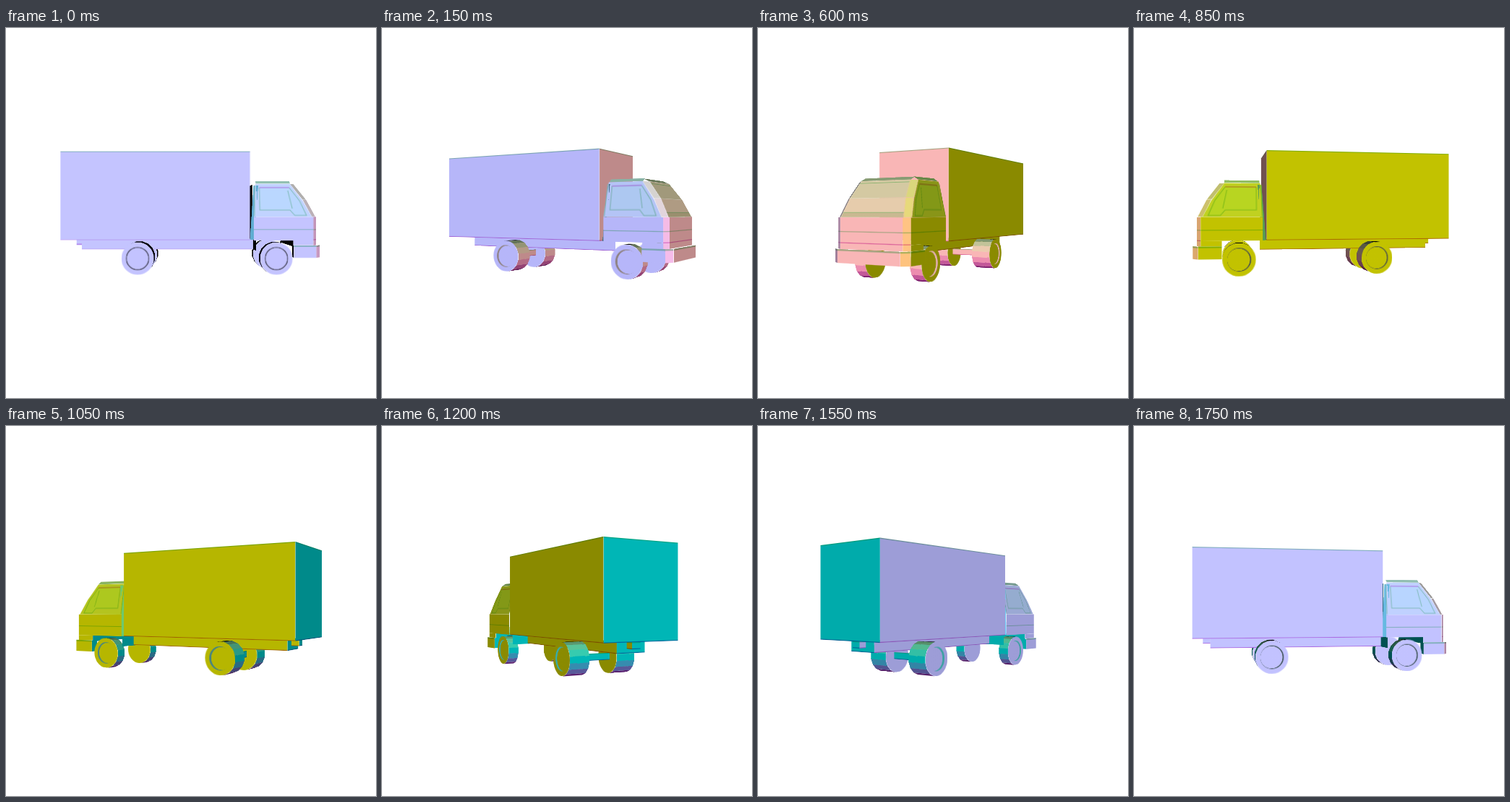
Write an HTML page without scripts that moves like this. It is 512 px wide and 512 px high and loops after 1.8 s.

```html
<!DOCTYPE html>
<html lang="en">
<head>
<meta charset="utf-8">
<title>Truck turntable</title>
<style>
@property --a { syntax: "<angle>"; inherits: true; initial-value: 0deg; }
html, body { margin: 0; width: 100%; height: 100%; overflow: hidden; background: #fff; }
.stage { position: relative; width: 512px; height: 512px; overflow: hidden; perspective: 748px; }
.truck, .wheel { position: absolute; transform-style: preserve-3d; }
.truck {
  left: 256px; top: 256px;
  transform: rotateY(calc(var(--a) * -1));
  animation: turn 1.8s steps(36) infinite;
}
@keyframes turn { from { --a: 0deg; } to { --a: 360deg; } }

/* A face: centre x y z, heading r, upward tilt t, size w h */
.p {
  --x: 0; --y: 0; --z: 0; --r: 0deg; --t: 0deg;
  --nx: calc(sin(var(--r)) * cos(var(--t)));
  --ny: sin(var(--t));
  --nz: calc(cos(var(--r)) * cos(var(--t)));
  transform: translate3d(calc(var(--x) * 1px), calc(var(--y) * 1px), calc(var(--z) * 1px))
    rotateY(var(--r)) rotateX(var(--t)) translate(-50%, -50%);
}
.wheel i {
  --w: 8.6; --h: var(--d);
  --f: calc(var(--i) * 22.5deg);
  --nx: sin(var(--f)); --ny: cos(var(--f)); --nz: 0;
  transform: rotateZ(var(--f)) translateY(-20.8px) rotateX(90deg) translate(-50%, -50%);
}
/* Colour comes from the normal, brightness from how far it faces the viewer */
.p, .wheel i {
  --k: calc(268 * pow(max(0, var(--nx) * sin(var(--a)) + var(--nz) * cos(var(--a))), .5));
  --cr: calc(var(--k) * pow(max(0, .5 + .5 * var(--nx)), .4545));
  --cg: calc(var(--k) * pow(max(0, .5 + .5 * var(--ny)), .4545));
  --cb: calc(var(--k) * pow(max(0, .5 + .5 * var(--nz)), .4545));
  --up: rgb(calc(var(--cr) * .68) calc(var(--cg) * .9) calc(var(--cb) * .72));
  --lo: rgb(calc(var(--cr) * .88) calc(var(--cg) * .55) calc(var(--cb) * .85));
  --pane: rgb(calc(var(--cr) * .96) calc(var(--cg) * 1.02) calc(var(--cb) * .98));
  color: rgb(var(--cr) var(--cg) var(--cb));
  position: absolute; left: 0; top: 0;
  width: calc(var(--w) * 1px); height: calc(var(--h) * 1px);
  transform-origin: 0 0;
  backface-visibility: hidden;
  background: currentColor;
}
.box { background: linear-gradient(var(--up) .7px, transparent 0 calc(100% - .8px), var(--lo) 0) currentColor; }
.nose { background: linear-gradient(transparent 16px, var(--up) 16px 16.7px, transparent 0 29.5px, var(--lo) 29.5px 30.2px, transparent 0) currentColor; }
.bump { background: linear-gradient(var(--up) 2px, transparent 0) currentColor; }
.glass { clip-path: polygon(4.5px 0, calc(100% - 4.5px) 0, 100% 100%, 0 100%); }
.glass.top { background: linear-gradient(transparent 3px, var(--up) 3px 4px, transparent 0) currentColor; }
.glass.low { background: linear-gradient(transparent 18px, var(--up) 18px 19.2px, #28500028 0) currentColor; }
.art { background: none; }
.art svg { display: block; width: 100%; height: 100%; overflow: visible; }
.flip svg { transform: scaleX(-1); }
.fill { fill: currentColor; }
.pane { fill: var(--pane); }
.lo, .up { fill: none; stroke-width: 1.1; }
.lo { stroke: var(--lo); }
.up { stroke: var(--up); }

.wheel { transform: translate3d(calc(var(--wx) * 1px), 59px, calc(var(--wz) * 1px)); }
.disc { --w: 42; --h: 42; border-radius: 50%; }
.disc.l { --z: calc(var(--d) / 2); }
.disc.r { --z: calc(var(--d) / -2); --r: 180deg; }
/* Recessed hub: the floor slides and uncovers the inner wall */
.rim::before {
  content: ""; position: absolute; inset: 5.8px; border-radius: 50%;
  --s: sin(var(--a));
  --q: pow(max(var(--s), -1 * var(--s)), .5);
  background:
    radial-gradient(circle at calc(50% + 4px * sin(var(--a) - var(--r))) 50%, currentColor 13.9px, transparent 14.5px),
    rgb(calc(var(--q) * (150 + 105 * var(--s))) calc(var(--q) * 185) calc(var(--q) * 185));
}
i:nth-of-type(1) { --i: 0; } i:nth-of-type(2) { --i: 1; }
i:nth-of-type(3) { --i: 2; } i:nth-of-type(4) { --i: 3; }
i:nth-of-type(5) { --i: 4; } i:nth-of-type(6) { --i: 5; }
i:nth-of-type(7) { --i: 6; } i:nth-of-type(8) { --i: 7; }
i:nth-of-type(9) { --i: 8; } i:nth-of-type(10) { --i: 9; }
i:nth-of-type(11) { --i: 10; } i:nth-of-type(12) { --i: 11; }
i:nth-of-type(13) { --i: 12; } i:nth-of-type(14) { --i: 13; }
i:nth-of-type(15) { --i: 14; } i:nth-of-type(16) { --i: 15; }
</style>
</head>
<body>
<svg width="0" height="0" style="position:absolute">
  <symbol id="door" viewBox="0 0 75 44">
    <path class="fill" d="M3 0H48L64 22.5L75 44H0Z"/>
    <path class="pane" d="M8 5H47L60 23L68 42H53L47 35H8Z"/>
    <path class="up" d="M45 9L50 33M8 5V35H47L53 42H68L60 23L47 5M2 2L1 43"/>
    <path class="lo" d="M8 5H47" stroke-width="2"/>
  </symbol>
  <symbol id="post-low" viewBox="0 0 12.9 24.8">
    <path class="fill" d="M0 0H9.2L12.9 24.8H3.7Z"/>
  </symbol>
  <symbol id="post-top" viewBox="0 0 16.3 25.8">
    <path class="fill" d="M0 0H9.2L16.3 25.8H7.1Z"/>
  </symbol>
</svg>

<div class="stage"><div class="truck">
  <!-- cargo box -->
  <div class="p box" style="--x:-45.9;--y:-22.4;--z:52;--w:244.4;--h:114"></div>
  <div class="p box" style="--x:-45.9;--y:-22.4;--z:-52;--w:244.4;--h:114;--r:180deg"></div>
  <div class="p box" style="--x:76.3;--y:-22.4;--w:104;--h:114;--r:90deg"></div>
  <div class="p box" style="--x:-168.1;--y:-22.4;--w:104;--h:114;--r:-90deg"></div>

  <!-- chassis, hitch, axle -->
  <div class="p box" style="--x:-32;--y:41.3;--z:20;--w:230;--h:13.5"></div>
  <div class="p box" style="--x:-32;--y:41.3;--z:-20;--w:230;--h:13.5;--r:180deg"></div>
  <div class="p box" style="--x:-147;--y:41.3;--w:40;--h:13.5;--r:-90deg"></div>
  <div class="p box" style="--x:-152;--y:39.3;--z:6;--w:10;--h:8"></div>
  <div class="p box" style="--x:-152;--y:39.3;--z:-6;--w:10;--h:8;--r:180deg"></div>
  <div class="p box" style="--x:-157;--y:39.3;--w:12;--h:8;--r:-90deg"></div>
  <div class="p box" style="--x:-64;--y:58;--w:40;--h:9;--r:90deg"></div>
  <div class="p box" style="--x:-75;--y:58;--w:40;--h:9;--r:-90deg"></div>

  <!-- cab sides -->
  <div class="p art" style="--x:118.5;--y:-16.5;--z:46.5;--w:75;--h:44;--t:11.8deg"><svg><use href="#door"/></svg></div>
  <div class="p art flip" style="--x:118.5;--y:-16.5;--z:-46.5;--w:75;--h:44;--r:180deg;--t:11.8deg"><svg><use href="#door"/></svg></div>
  <div class="p nose" style="--x:119.5;--y:20;--z:51;--w:77;--h:30"></div>
  <div class="p nose" style="--x:119.5;--y:20;--z:-51;--w:77;--h:30;--r:180deg"></div>
  <div class="p" style="--x:145;--y:38.5;--z:51;--w:26;--h:7.4"></div>
  <div class="p" style="--x:145;--y:38.5;--z:-51;--w:26;--h:7.4;--r:180deg"></div>

  <!-- cab front and corners -->
  <div class="p art" style="--x:153.5;--y:-6;--z:45.2;--w:12.9;--h:24.8;--r:49.4deg;--t:27.3deg"><svg><use href="#post-low"/></svg></div>
  <div class="p art flip" style="--x:153.5;--y:-6;--z:-45.2;--w:12.9;--h:24.8;--r:130.6deg;--t:27.3deg"><svg><use href="#post-low"/></svg></div>
  <div class="p art" style="--x:140;--y:-27.5;--z:40.7;--w:16.3;--h:25.8;--r:49.4deg;--t:35.6deg"><svg><use href="#post-top"/></svg></div>
  <div class="p art flip" style="--x:140;--y:-27.5;--z:-40.7;--w:16.3;--h:25.8;--r:130.6deg;--t:35.6deg"><svg><use href="#post-top"/></svg></div>
  <div class="p nose" style="--x:160.5;--y:23.5;--z:47.5;--w:9;--h:37;--r:54.5deg"></div>
  <div class="p nose" style="--x:160.5;--y:23.5;--z:-47.5;--w:9;--h:37;--r:125.5deg"></div>
  <div class="p nose" style="--x:163;--y:23.5;--w:88;--h:37;--r:90deg"></div>
  <div class="p glass low" style="--x:156.5;--y:-6;--w:88;--h:24.8;--r:90deg;--t:26.6deg"></div>
  <div class="p glass top" style="--x:143;--y:-27.5;--w:79;--h:26.6;--r:90deg;--t:37.3deg"></div>

  <!-- roof edges and cab rear -->
  <div class="p" style="--x:130.5;--y:-40;--w:72;--h:9.9;--r:90deg;--t:66deg"></div>
  <div class="p" style="--x:107;--y:-40;--z:39;--w:45;--h:7.4;--t:56.3deg"></div>
  <div class="p" style="--x:107;--y:-40;--z:-39;--w:45;--h:7.4;--r:180deg;--t:56.3deg"></div>
  <div class="p" style="--x:82;--y:-.5;--z:45;--w:8;--h:71;--r:-45deg;--t:6deg"></div>
  <div class="p" style="--x:82;--y:-.5;--z:-45;--w:8;--h:71;--r:225deg;--t:6deg"></div>
  <div class="p" style="--x:80;--y:-1;--w:84;--h:72;--r:-90deg"></div>

  <!-- wheel arches -->
  <div class="p" style="--x:85;--y:42;--w:88;--h:15;--r:-90deg"></div>
  <div class="p" style="--x:132;--y:39;--w:102;--h:9;--r:-90deg"></div>

  <!-- bumper -->
  <div class="p bump" style="--x:168;--y:49.8;--w:88;--h:16.4;--r:90deg"></div>
  <div class="p bump" style="--x:164.5;--y:49.8;--z:48.5;--w:11.4;--h:16.4;--r:52.1deg"></div>
  <div class="p bump" style="--x:164.5;--y:49.8;--z:-48.5;--w:11.4;--h:16.4;--r:127.9deg"></div>
  <div class="p bump" style="--x:146.5;--y:49.8;--z:53;--w:29;--h:16.4"></div>
  <div class="p bump" style="--x:146.5;--y:49.8;--z:-53;--w:29;--h:16.4;--r:180deg"></div>
  <div class="p" style="--x:132;--y:49.8;--z:47;--w:12;--h:16.4;--r:-90deg"></div>
  <div class="p" style="--x:132;--y:49.8;--z:-47;--w:12;--h:16.4;--r:-90deg"></div>

  <!-- wheels -->
  <div class="wheel" style="--wx:-69.2;--wz:34;--d:28"><i></i><i></i><i></i><i></i><i></i><i></i><i></i><i></i><i></i><i></i><i></i><i></i><i></i><i></i><i></i><i></i><b class="p disc l rim"></b><b class="p disc r"></b></div>
  <div class="wheel" style="--wx:-69.2;--wz:-34;--d:28"><i></i><i></i><i></i><i></i><i></i><i></i><i></i><i></i><i></i><i></i><i></i><i></i><i></i><i></i><i></i><i></i><b class="p disc l"></b><b class="p disc r rim"></b></div>
  <div class="wheel" style="--wx:110.6;--wz:40;--d:16"><i></i><i></i><i></i><i></i><i></i><i></i><i></i><i></i><i></i><i></i><i></i><i></i><i></i><i></i><i></i><i></i><b class="p disc l rim"></b><b class="p disc r"></b></div>
  <div class="wheel" style="--wx:110.6;--wz:-40;--d:16"><i></i><i></i><i></i><i></i><i></i><i></i><i></i><i></i><i></i><i></i><i></i><i></i><i></i><i></i><i></i><i></i><b class="p disc l"></b><b class="p disc r rim"></b></div>
</div></div>
</body>
</html>
```
